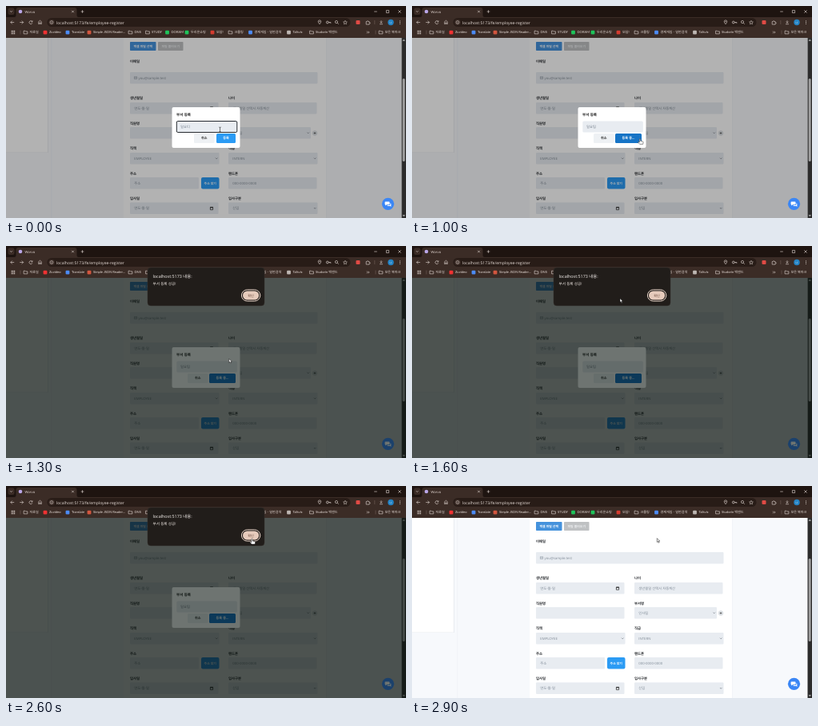
These frames come from a looping animation (500 px wide and 266 px high, 3000 ms). An HTML page:

```html
<!DOCTYPE html>
<html lang="ko">
<head>
<meta charset="utf-8">
<title>부서 등록</title>
<style>
  html, body { margin: 0; width: 100%; height: 100%; overflow: hidden; background: #fff; }
  svg { display: block; width: 100vw; height: 100vh; }
  text { font-family: "Open Sans", "Noto Sans CJK KR", "Noto Sans CJK", sans-serif; text-rendering: geometricPrecision; white-space: pre; }
  .mark { font-family: Lato, "Noto Sans CJK KR", "Noto Sans CJK", sans-serif; }
</style>
</head>
<body>
<svg id="stage" viewBox="0 0 500 266" xmlns="http://www.w3.org/2000/svg"></svg>
<script>
const INK = '#e6dcd7', BAR = '#3b2c26', FIELD = '#e8ecf1', HINT = '#7f8a96', BLUE = '#2b9bf4';

// Drawing helpers: y is the vertical centre of a text line
const rect = (x, y, w, h, fill, r = 0, extra = '') =>
  `<rect x="${x}" y="${y}" width="${w}" height="${h}" rx="${r}" fill="${fill}" ${extra}/>`;
const dot = (x, y, r, fill, extra = '') => `<circle cx="${x}" cy="${y}" r="${r}" fill="${fill}" ${extra}/>`;
const text = (x, y, s, fill, size = 4.3, extra = '') =>
  `<text x="${x}" y="${y + size * .36}" font-size="${size}" fill="${fill}" ${extra}>${s}</text>`;
const line = (x, y, d, stroke = INK, width = .6) =>
  `<path transform="translate(${x} ${y})" d="${d}" fill="none" stroke="${stroke}" stroke-width="${width}"/>`;
const BOLD = 'font-weight="700"', MID = 'text-anchor="middle"';
const button = (x, y, w, h, fill, s, color = '#fff', r = 1.5, size = 3.9, id = '') =>
  `<g id="${id}">` + rect(x, y, w, h, fill, r) + text(x + w / 2, y + h / 2, s, color, size, `${MID} ${BOLD}`) + '</g>';

// Browser frame
const folder = x => line(x, 33, 'M-2.4-1.8h1.8l.7.7h2.3v3h-4.8z');
const bookmark = (x, s, color) =>
  (color ? rect(x - 2.4, 30.7, 4.8, 4.8, color, 1) : folder(x)) + text(x + 5, 33, s, INK, 4.1, 'class="mark"');

function browserFrame() {
  const tabs = rect(0, 0, 500, 14, '#1e1410') +
    rect(2.5, 2.5, 8, 8.5, BAR, 2) + line(6.5, 6.8, 'M-1.3-.6l1.3 1.3 1.3-1.3') +
    `<path d="M10 14q2.5 0 2.5-2.5V5q0-3 3-3h70q3 0 3 3v6.5q0 2.5 2.5 2.5z" fill="${BAR}"/>` +
    dot(18, 7, 2.3, '#b9a6e8') + text(23.5, 7, 'Worvo', INK, 4.2) +
    line(83.5, 7, 'M-1.3-1.3l2.6 2.6M1.3-1.3l-2.6 2.6') +
    line(95.5, 7, 'M-1.8 0h3.6M0-1.8v3.6') +
    line(462, 7, 'M-1.8 0h3.6') + line(477, 7, 'M-1.6-1.6h3.2v3.2h-3.2z') +
    line(492, 7, 'M-1.7-1.7l3.4 3.4M1.7-1.7l-3.4 3.4');
  const tools = rect(0, 14, 500, 26, BAR) +
    line(8, 20.5, 'M2.2 0h-4.4l2-2m-2 2l2 2') + line(19.5, 20.5, 'M-2.2 0h4.4l-2-2m2 2l-2 2') +
    line(31, 20.5, 'M1.8-.8a2 2 0 1 0 .1 1.6M2-2.3v1.7h-1.7') +
    line(42.5, 20.5, 'M-1.8 2v-2.8l1.8-1.5 1.8 1.5v2.8h-1.3v-1.6h-1v1.6z') +
    rect(51.5, 15, 379, 11, '#281c17', 5.5) + dot(57, 20.5, 3.7, BAR) +
    dot(57, 20.5, 2, 'none', `stroke="${INK}" stroke-width=".5"`) + line(57, 20.5, 'M0-.3v1.4M0-1.1v.4') +
    text(63, 20.8, 'localhost:5173/fe/employee-register', INK, 5.05) +
    line(392, 20.5, 'M0 2.3q-1.8-2.2-1.8-3.2a1.8 1.8 0 0 1 3.6 0q0 1-1.8 3.2z') + dot(392, 19.6, .6, INK) +
    dot(401.8, 20.5, 1.4, 'none', `stroke="${INK}" stroke-width=".7"`) + line(403.2, 20.5, 'M0 0h2.7v1.3m-1.1-1.3v1') +
    dot(413, 20, 1.6, 'none', `stroke="${INK}" stroke-width=".6"`) + line(414.2, 21.2, 'M0 0l1.6 1.6') +
    line(424, 20.5, 'M0-2.3l.7 1.6 1.7.2-1.3 1.1.4 1.7-1.5-.9-1.5.9.4-1.7-1.3-1.1 1.7-.2z', INK, .5) +
    rect(437.5, 18, 5, 5, '#e04a45', 1) +
    line(452, 20.8, 'M-1.8-1.2h1a.9.9 0 1 1 1.8 0h1v1.1a.8.8 0 1 1 0 1.4v1h-3.8z') +
    line(460.8, 20.5, 'M0-2.5v5', '#75645b') + line(469, 20.5, 'M0-2.3v3m-1.5-1.5l1.5 1.5 1.5-1.5M-2 2.2h4') +
    dot(481, 20.5, 3.7, '#2484c6') + text(481, 20.5, '나', '#fff', 3, MID) +
    [-1.8, 0, 1.8].map(d => dot(492.5, 20.5 + d, .5, INK)).join('');
  const marks = [
    [24.5, '자료실'], [49, 'Zuvideo', '#f03232'], [77, 'Translate', '#4c8bf5'],
    [104, 'Simple JSON Reader...', '#d3563f'], [155.5, 'DNS'], [177, 'STUDY'],
    [201.5, 'DORAM', '#1ec35a'], [226, '두리온쇼핑', '#1ec35a'], [258, '모담!', '#d43b2f'],
    [280.5, '크롤링'], [305.5, '경제게임 - 일반검색', '#4c8bf5'], [353.5, 'Talkvix', '#bdb6b2'],
    [382, 'Studorin 백엔드'], [468.5, '모든 북마크']
  ].map(m => bookmark(...m)).join('');
  let grid = '';
  for (let i = 0; i < 9; i++) grid += rect(6.7 + i % 3 * 1.7, 30.8 + (i / 3 | 0) * 1.7, 1.1, 1.1, INK);
  return tabs + tools + grid + line(18, 33, 'M0-2.5v5', '#75645b') + marks +
    line(452.5, 33, 'M-1.5-1.3l1.3 1.3-1.3 1.3M.3-1.3l1.3 1.3-1.3 1.3') + line(462, 33, 'M0-2.5v5', '#75645b');
}

// Form page
const field = (x, y, w, hint = '', kind = '') =>
  rect(x, y, w, 14.5, FIELD, 1) + text(x + 5.3, y + 7.3, hint, HINT, 4.3) +
  (kind === 'date' ? line(x + 102, y + 7.3, 'M-1.6-1.3h3.2v3.2h-3.2zM-1.6-.8h3.2M-1-2v.7M1-2v.7', '#222', .7) : '') +
  (kind === 'select' ? line(x + w - 3.3, y + 7.2, 'M-1.2-.6l1.2 1.2 1.2-1.2', '#59626c') : '');

function formPage() {
  const label = (x, y, s) => text(x, y, s, '#25282c', 4.4, BOLD);
  const rows = [
    [115.5, '생년월일', '나이'], [147, '직원명', '부서명'], [178.5, '직책', '직급'],
    [210, '주소', '핸드폰'], [241, '입사일', '입사구분']
  ].map(([y, a, b]) => label(155, y, a) + label(278, y, b)).join('');
  return rect(0, 40, 500, 226, '#f7f9fc') +
    rect(52, 40, 1, 144, '#e9ecf0') + rect(0, 183, 53, 1, '#e9ecf0') + rect(0, 40, 52, 143.5, '#fff') +
    rect(56.5, 40, .6, 226, '#edf0f5') + rect(147, 40, 253, 226, '#fff') + rect(400, 40, .6, 226, '#edf0f5') +
    button(155, 45, 32.5, 11, '#4592dc', '엑셀 파일 선택', '#fff', .8) +
    button(190, 45, 31.5, 11, '#bfc1c3', '파일 불러오기', '#eef0f2', .8) +
    label(155, 69.5, '이메일') + field(155, 83, 234.5) +
    line(162, 90.2, 'M-1.6-1.3h3.2v2.6h-3.2zl1.6 1.4 1.6-1.4', HINT, .5) +
    text(165.5, 90.2, 'you@sample.test', HINT) + rows +
    field(155, 121, 110.5, '연도-월-일', 'date') + field(278, 121, 110.5, '생년월일 선택시 자동계산') +
    field(155, 152, 110.5) + field(278, 152, 103, '인사팀', 'select') +
    dot(386, 159.5, 2.9, '#e3e7eb', 'stroke="#c4cad0" stroke-width=".4"') + line(386, 159.5, 'M-1.4 0h2.8M0-1.4v2.8', '#333') +
    field(155, 184, 111.5, 'EMPLOYEE', 'select') + field(278, 184, 111.5, 'INTERN', 'select') +
    field(155, 215, 86, '주소') + button(244, 215, 22.5, 14.5, BLUE, '주소 찾기', '#fff', 2) +
    field(278, 215, 110.5, '000-0000-0000') +
    field(155, 246.5, 110.5, '연도-월-일', 'date') + field(278, 246.5, 111.5, '신입', 'select');
}

const scrollbar = rect(494.5, 40, 5.5, 226, '#2c2c2c') + rect(495.7, 91, 3, 104, '#9f9f9f', 1.5) +
  '<path d="M495.6 44l1.7-2.5 1.7 2.5zM495.6 262l1.7 2.5 1.7-2.5z" fill="#9f9f9f"/>';

const chatButton = dot(477.5, 248.3, 7.6, '#3a86f5') +
  '<g fill="#fff" transform="translate(477.5 248.3) scale(.82)">' +
  '<path d="M-4-3.300h5.500q1 0 1 1v2.500q0 1-1 1h-3.500l-2 1.600v-1.600q-.8 0-.8-1v-2.500q0-1 .8-1z"/>' +
  '<path d="M3.500-1.100q1.200 0 1.200 1v3l.2 1.400-1.700-1.100h-3.500q-1 0-1-1h3.500q1.300 0 1.300-1.300z"/></g>';

const modal = rect(0, 40, 494.5, 226, '#000', 0, 'opacity=".3"') +
  rect(207.5, 127, 85, 51, '#fff', 2) + text(213, 136.5, '부서 등록', '#222', 4.6, BOLD) +
  rect(213.3, 144.5, 75.5, 14, FIELD, 1.5, 'id="input"') + text(218, 151.7, '<tspan id="typed"/>', '#77828e') +
  button(235, 160, 25.5, 12, '#eef1f4', '취소', '#333', 1.5, 4.1, 'cancel') +
  '<g id="idle">' + rect(263, 160, 24, 12, BLUE, 1.5, 'id="submit"') + text(275, 166, '등록', '#fff', 4.1, `${MID} ${BOLD}`) + '</g>' +
  button(254, 160, 33, 12, '#1674c6', '등록 중...', '#fff', 1.5, 4.1, 'busy');

const alertBox = rect(177, 27, 146, 48, '#211d1a', 4, 'stroke="#37302c" stroke-width=".5"') +
  text(183.5, 38, 'localhost:5173 내용:', '#fbf6f3', 5.4) + text(183.5, 47.7, '부서 등록 성공!', '#f0e9e5', 4.6) +
  rect(294.4, 54.9, 23.4, 14.2, 'none', 7.1, 'stroke="#ead6ca" stroke-width="1"') +
  rect(296, 56.5, 20.2, 11, '#e6cbbc', 5.5) + text(306, 62, '확인', '#6b4a3c', 4.2, MID);

const cursors =
  '<path id="beam" d="M-1.3-3q1.3 0 1.3.7v4.6q0 .7-1.3.7M1.3-3q-1.3 0-1.3.7M1.3 3q-1.3 0-1.3-.7" fill="none" stroke="#222" stroke-width=".6"/>' +
  '<path id="hand" transform="scale(1.15)" d="M-.6 0q.6-.7 1.2 0v2.2l2.2.5q.8.2.8 1l-.4 2h-3.5l-2-2.2q.4-.8 1.1-.3l.6.5z" fill="#fff" stroke="#111" stroke-width=".4"/>' +
  '<path id="arrow" d="M0 0v4.8l1.1-1 .8 1.8.9-.4-.8-1.7h1.5z" fill="#fff" stroke="#111" stroke-width=".5"/>';

const stage = document.getElementById('stage');
stage.innerHTML = browserFrame() + formPage() + `<g id="modal">${modal}</g>` + scrollbar + chatButton +
  rect(0, 40, 500, 226, '#06100c', 0, 'id="scrim" opacity=".58"') +
  `<g id="alert">${alertBox}</g><g id="cursor">${cursors}</g>`;

const el = id => document.getElementById(id);
const show = (id, on) => { el(id).style.display = on ? '' : 'none'; };

// Pointer path: time, x, y
const path = [[0, 267.5, 155], [300, 267.5, 155], [700, 285, 166.8], [1200, 285, 166.8],
  [1600, 260, 65.8], [1900, 261, 65.8], [2400, 307.5, 66.5], [2600, 307.5, 66.5], [2700, 306.3, 65.6], [3000, 306.3, 65.6]];

function pointer(t) {
  const i = path.findIndex(p => p[0] > t), [t0, x0, y0] = path[i - 1], [t1, x1, y1] = path[i];
  const k = (t - t0) / (t1 - t0);
  return [x0 + (x1 - x0) * k, y0 + (y1 - y0) * k];
}

function draw() {
  const t = Math.floor(performance.now() % 3000 / 100) * 100;  // ten steps a second
  const [x, y] = pointer(t);
  const busy = t >= 900, alerting = t >= 1100 && t < 2700, settled = t >= 1200 && t < 2700;
  const overSubmit = t < 1300 && y > 160, overConfirm = settled && x > 295 && y < 70;
  const hand = overSubmit || overConfirm;

  show('modal', t < 2700);
  el('typed').textContent = t < 200 ? '일요티' : '일요팀';
  el('input').setAttribute('stroke', busy ? 'none' : '#25292e');
  el('cancel').setAttribute('transform', `translate(${busy ? -8 : 0} 0)`);
  el('submit').setAttribute('fill', overSubmit ? '#1c83d8' : BLUE);
  show('idle', !busy);
  show('busy', busy);

  show('scrim', alerting);
  el('alert').setAttribute('opacity', settled ? 1 : t === 1100 ? .36 : t === 2700 ? .2 : 0);
  el('alert').setAttribute('transform', `translate(0 ${settled ? 0 : -4})`);

  el('cursor').setAttribute('transform', `translate(${x} ${y})`);
  show('beam', t < 1200 && !hand);
  show('hand', hand);
  show('arrow', t >= 1300 && !hand);
  requestAnimationFrame(draw);
}
draw();
</script>
</body>
</html>
```
